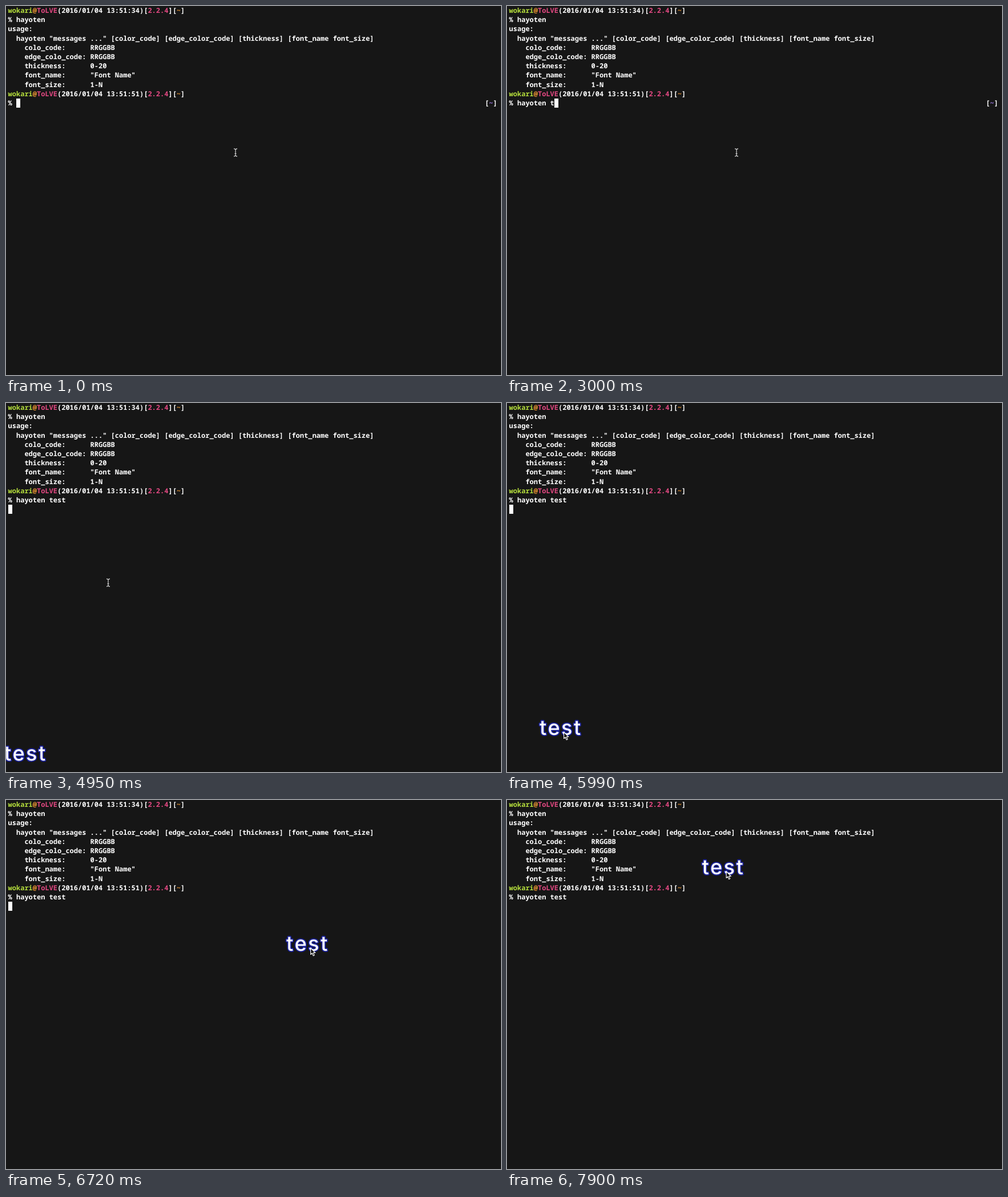
Recreate the animation shown at these times as an HTML page. Size 867 px wide and 646 px high, loop 8000 ms.

```html
<!DOCTYPE html>
<html lang="en">
<head>
<meta charset="utf-8">
<title>Terminal captions</title>
<style>
  html, body { margin: 0; width: 100%; height: 100%; overflow: hidden; background: #161616; }
  #stage { position: relative; width: 867px; height: 646px; overflow: hidden; background: #161616; }
  pre {
    position: absolute; left: 3.6px; top: 0; margin: 0; color: #fff;
    font: 600 12px/16.2px "Noto Sans Mono", "DejaVu Sans Mono", monospace;
    text-rendering: geometricPrecision; font-variant-ligatures: none;
  }
  #side { left: 838.8px; top: 162px; }
  .user { color: #b4dd3c; }
  .mark { color: #f99e34; }
  .pink { color: #e54983; }
  .path { color: #ab84f8; }
  #caret { position: absolute; width: 7px; height: 16px; background: #fff; }
  svg { position: absolute; left: 0; top: 0; }
  #caption {
    font: 500 36px Inter, "Liberation Sans", sans-serif; letter-spacing: 2.5px;
    text-anchor: middle; text-rendering: geometricPrecision;
    fill: #fff; stroke: #1a2198; stroke-width: 3.6; stroke-linejoin: round; paint-order: stroke;
  }
</style>
</head>
<body>
<div id="stage">
<pre><span class="user">wokari</span><span class="mark">@</span><span class="pink">ToLVE</span>(2016/01/04 13:51:34)[<span class="pink">2.2.4</span>][<span class="mark">~</span>]
% hayoten
usage:
  hayoten "messages ..." [color_code] [edge_color_code] [thickness] [font_name font_size]
    colo_code:      RRGGBB
    edge_colo_code: RRGGBB
    thickness:      0-20
    font_name:      "Font Name"
    font_size:      1-N
<span class="user">wokari</span><span class="mark">@</span><span class="pink">ToLVE</span>(2016/01/04 13:51:51)[<span class="pink">2.2.4</span>][<span class="mark">~</span>]
% <span id="input"></span></pre>
<pre id="side">[<span class="path">~</span>]</pre>
<div id="caret"></div>
<svg width="867" height="646" viewBox="0 0 867 646">
  <text id="caption" x="1.4">test</text>
  <path id="beam" fill="none" stroke="#d8d8d8" stroke-width="1.2"
    d="M-3-6.6Q0-6.6 0-4.4Q0-6.6 3-6.6M0-4.4V4.4M-3 6.6Q0 6.6 0 4.4Q0 6.6 3 6.6M-1.5 2H1.5"/>
  <path id="arrow" fill="#111" stroke="#fff" stroke-width="1.1" stroke-linejoin="round"
    d="M.6.8V12L3.2 9.6L5.2 14.2L7.2 13.3L5.2 8.9H8.8Z"/>
</svg>
</div>
<script>
  const LOOP = 8000, CELL = 7.2, ROW = 16.2, LEFT = 3.6;
  const ENTER = 4050, LEAVE = 5100, GRAB = 5550;
  const el = id => document.getElementById(id);
  const [input, side, caret, caption, beam, arrow] =
    ["input", "side", "caret", "caption", "beam", "arrow"].map(el);

  // [start time, typed text]
  const typing = [
    [0, ""], [150, "h"], [300, "ha"], [450, "hay"], [600, "hayot"], [750, "hayote"],
    [900, "hayoten "], [1050, "hayoten -"], [1200, "hayoten -f"],
    [1650, "hayoten -"], [1950, "hayoten "], [3000, "hayoten t"],
    [3450, "hayoten te"], [3600, "hayoten tes"], [3750, "hayoten test"]
  ];

  // [start time, caption centre, caption baseline]
  const drag = [
    [ENTER, 33, 626], [5700, 38, 621], [5840, 58, 607], [5990, 93, 581],
    [6140, 137, 547], [6280, 182, 510], [6430, 227, 472], [6580, 471, 312],
    [6720, 527, 264], [6870, 497, 226], [7020, 435, 204], [7170, 383.5, 188],
    [7310, 366, 166], [7460, 364, 149], [7610, 368, 139], [7760, 374, 134],
    [7900, 377.5, 130]
  ];

  // [start time, caret visible]
  const blink = [[0, true], [6140, false], [6720, true], [7460, false]];

  const at = (steps, t) => steps.filter(s => s[0] <= t).pop() || steps[0];
  const show = (node, on) => { node.style.visibility = on ? "visible" : "hidden"; };
  const move = (node, x, y) => node.setAttribute("transform", `translate(${x} ${y})`);

  function draw(t) {
    const text = at(typing, t)[1];
    const running = t >= ENTER;
    if (input.textContent !== text) input.textContent = text;
    show(side, !running);

    const col = running ? 0 : text.length + 2;
    caret.style.left = Math.round(LEFT + col * CELL) + "px";
    caret.style.top = Math.round(ROW * (running ? 11 : 10)) + "px";
    show(caret, at(blink, t)[1]);

    const [, x, y] = at(drag, t);
    move(caption, x, y);
    show(caption, running);
    move(arrow, x + 6, y - 5.5);
    show(arrow, t >= GRAB);

    if (t < 4950) move(beam, 402, 256.5);
    else move(beam, 179, 314.5);
    show(beam, t < LEAVE);
  }

  const start = performance.now();
  function tick() {
    draw((performance.now() - start) % LOOP);
    requestAnimationFrame(tick);
  }
  tick();
</script>
</body>
</html>
```
